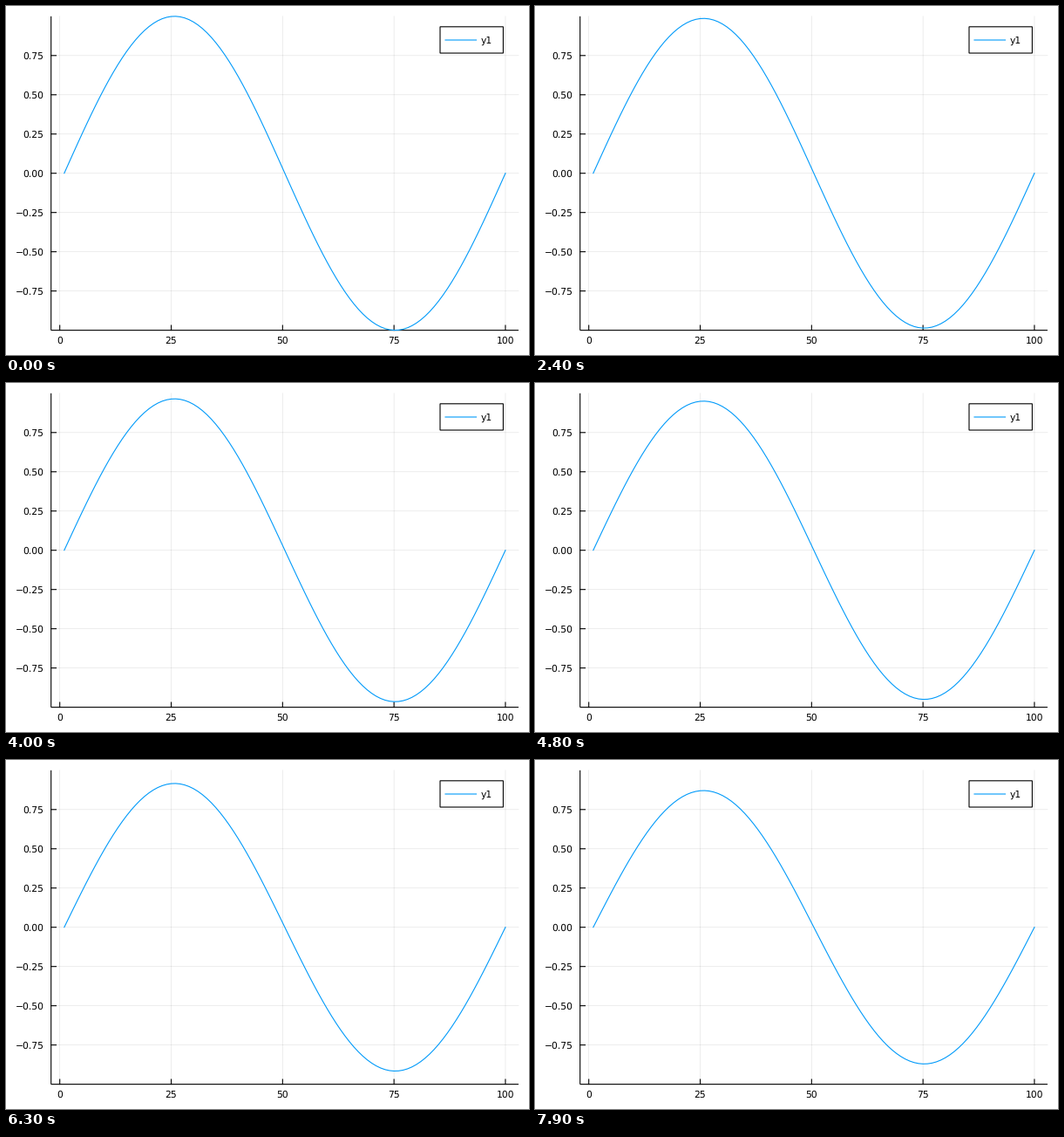
Recreate the animation shown at these times as a matplotlib script. Size 600 by 400 pixels, loop 8000 ms.

```python
import numpy as np
import matplotlib.pyplot as plt
from matplotlib.animation import FuncAnimation
from matplotlib.patches import Rectangle

W, H, DPI = 600, 400, 100
FRAMES, STEP_MS = 80, 100
PT = 72 / DPI  # points per pixel
LEFT, RIGHT, TOP, BOTTOM = 51.7, 588, 11.8, 371.6
BLUE = "#009AFA"
OMEGA = 2 * np.pi / 99 * 0.1  # phase advance per step of the standing wave

plt.rcParams.update({
    "font.family": "DejaVu Sans",
    "font.size": 10.7 * PT,
    "text.hinting": "none",
})

fig = plt.figure(figsize=(W / DPI, H / DPI), dpi=DPI, facecolor="white")
ax = fig.add_axes([0, 0, 1, 1])
ax.set_xlim(0, W)
ax.set_ylim(H, 0)
ax.axis("off")


def px(v):
    return 61.7 + 5.1125 * v


def py(v):
    return 191.7 - 179.9 * v


def line(xs, ys, color="black", width=1.1, **kw):
    return ax.plot(xs, ys, color=color, lw=width * PT, snap=False, **kw)[0]


def label(x, y, text, ha):
    ax.text(x, y, text, ha=ha, va="baseline", color="black")


x_ticks = np.arange(0, 101, 25)
y_ticks = np.arange(-0.75, 0.76, 0.25)

for v in x_ticks:
    x = px(v)
    line([x, x], [TOP, BOTTOM], width=0.7, alpha=0.1)
    line([x, x], [BOTTOM, BOTTOM - 5.5])
    label(x, 387, f"{v}", "center")

for v in y_ticks:
    y = py(v)
    line([LEFT, RIGHT], [y, y], width=0.7, alpha=0.1)
    line([LEFT, LEFT + 5.8], [y, y])
    label(43.4, y + 4.1, f"{v:.2f}".replace("-", "\u2212"), "right")

line([LEFT, LEFT], [TOP, BOTTOM], solid_capstyle="butt")
line([LEFT, RIGHT], [BOTTOM, BOTTOM], solid_capstyle="butt")

# legend
ax.add_patch(Rectangle((498, 23.8), 72.4, 30.2, fc="white", ec="black",
                       lw=1.1 * PT, snap=False, zorder=3))
line([504, 539.5], [39, 39], BLUE, zorder=4)
label(545, 43, "y1", "left")

n = np.arange(1, 101)
shape = np.sin(2 * np.pi * (n - 1) / 99)
curve = line(px(n), py(shape), BLUE, zorder=5)


def update(frame):
    curve.set_ydata(py(np.cos(OMEGA * (frame + 2)) * shape))
    return [curve]


anim = FuncAnimation(fig, update, frames=FRAMES, interval=STEP_MS,
                     repeat=True, repeat_delay=0)
plt.show()
```
